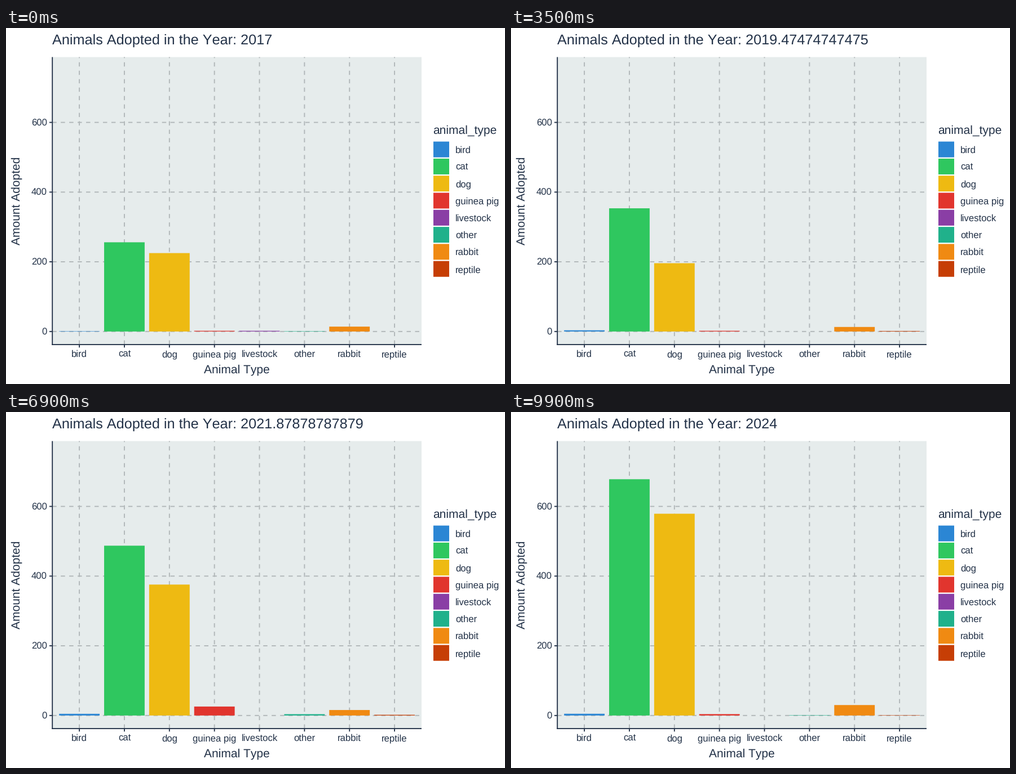
A matplotlib script that plays this animation: 885x632 px, repeating every 10000 ms.

```python
import numpy as np
import matplotlib.pyplot as plt
from matplotlib.animation import FuncAnimation
from matplotlib.patches import Rectangle

W, H, DPI = 885, 632, 100
FRAMES, INTERVAL = 100, 100
FIRST, LAST = 2017, 2024

INK, PANEL, GRID = "#233248", "#e6ecec", "#b0b6b8"
LEFT, RIGHT, TOP, BOTTOM = 82.2, 737, 51.6, 562
STEP = (RIGHT - LEFT) / 8.2
LINE = 1.87
NONE = np.nan

# Yearly adoptions; a bar only shows between two years that both have data.
ANIMALS = {
    "bird": ("#2b86d4", [1, 3, 1, 6, 4, 5, 6, 5]),
    "cat": ("#2fc75f", [256, 243, 440, 267, 255, 526, 750, 678]),
    "dog": ("#eeba12", [225, 186, 243, 149, 170, 410, 592, 579]),
    "guinea pig": ("#e1352e", [2, 2, 3, 1, 6, 29, 7, 4]),
    "livestock": ("#8a3ea5", [2, 1, 1, NONE, NONE, NONE, NONE, NONE]),
    "other": ("#20b18b", [1, NONE, NONE, 7, 3, 4, 4, 1]),
    "rabbit": ("#f08a12", [14, 28, 22, 4, 8, 17, 24, 30]),
    "reptile": ("#c63e05", [NONE, 4, 1, 2, 2, 2, 1, 1]),
}
GAPS = {("reptile", 5)}  # no bar while moving on from this year index
KEYS = np.round(np.linspace(0, FRAMES - 1, LAST - FIRST + 1)).astype(int)

plt.rcParams.update({
    "font.family": "Liberation Sans",
    "text.hinting": "none",
    "text.kerning_factor": 6,
    "text.color": INK,
})

fig = plt.figure(figsize=(W / DPI, H / DPI), dpi=DPI, facecolor="white")
ax = fig.add_axes([0, 0, 1, 1])
ax.set(xlim=(0, W), ylim=(H, 0))
ax.axis("off")


def px(size):
    return size * 72 / DPI


def y_at(value):
    return BOTTOM - (BOTTOM - TOP) * (value + 37.5) / 825


def x_at(index):
    return LEFT + STEP * (index + 0.6)


def rect(x, y, w, h, color, z=1):
    return ax.add_patch(Rectangle((x, y), w, h, fc=color, lw=0, snap=False, zorder=z))


def line(xs, ys, color=INK, z=4, **style):
    ax.plot(xs, ys, color=color, lw=px(LINE), snap=False, zorder=z,
            solid_capstyle="butt", **style)


def label(x, y, text, size, ha="left", **style):
    return ax.text(x, y, text, fontsize=px(size), ha=ha, va="baseline", **style)


def value_at(name, frame):
    data = ANIMALS[name][1]
    k = int(np.searchsorted(KEYS, frame, side="right")) - 1
    if frame == KEYS[k]:
        value = data[k]
    elif (name, k) in GAPS:
        value = NONE
    else:
        t = (frame - KEYS[k]) / (KEYS[k + 1] - KEYS[k])
        value = data[k] + (data[k + 1] - data[k]) * t
    return 0 if np.isnan(value) else value


# Panel, grid and axes
rect(LEFT, TOP, RIGHT - LEFT, BOTTOM - TOP, PANEL)
dashed = dict(color=GRID, z=2, linestyle=(0, (4, 4)))
for tick in (0, 200, 400, 600):
    y = y_at(tick)
    line([LEFT, RIGHT], [y, y], **dashed)
    line([LEFT - 5.25, LEFT], [y, y])
    label(73, round(y + 6), str(tick), 16.8, "right")
for i, name in enumerate(ANIMALS):
    x = x_at(i)
    line([x, x], [BOTTOM, TOP], **dashed)
    line([x, x], [BOTTOM, BOTTOM + 5.25])
    label(x, 584, name, 16.8, "center")
line([LEFT, LEFT], [TOP, BOTTOM + LINE / 2])
line([LEFT - LINE / 2, RIGHT], [BOTTOM, BOTTOM])

label((LEFT + RIGHT) / 2, 613, "Animal Type", 21, "center")
ax.text(25, (TOP + BOTTOM) / 2, "Amount Adopted", fontsize=px(21), rotation=90,
        rotation_mode="anchor", ha="center", va="baseline")

# Legend
label(757, 188, "animal_type", 21)
for i, (name, (color, _)) in enumerate(ANIMALS.items()):
    y = 215.6 + 30.3 * i
    rect(758, y - 14, 28, 28, color)
    label(797, round(y + 6), name, 16.8)

title = label(82, 29, "", 25.2)
bars = {
    name: rect(x_at(i) - 0.45 * STEP, y_at(0), 0.9 * STEP, 0, color, 3)
    for i, (name, (color, _)) in enumerate(ANIMALS.items())
}


def update(frame):
    year = FIRST + (LAST - FIRST) * frame / (FRAMES - 1)
    title.set_text(f"Animals Adopted in the Year: {year:.15g}")
    for name, bar in bars.items():
        value = value_at(name, frame)
        bar.set_height(y_at(value) - y_at(0))
        bar.set_visible(value > 0)
    return [title, *bars.values()]


anim = FuncAnimation(fig, update, frames=FRAMES, interval=INTERVAL,
                     repeat=True, repeat_delay=0, blit=False)
plt.show()
```
